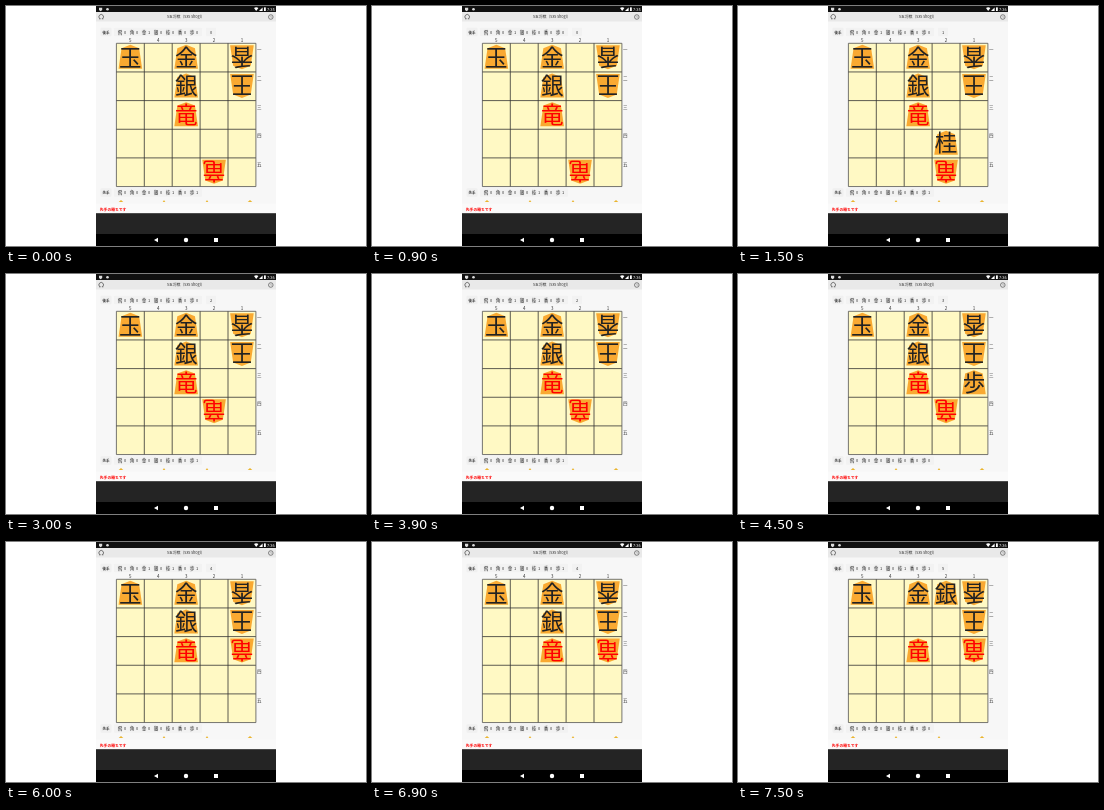
Recreate the animation shown at these times as an HTML page. Size 360x240 px, loop 9000 ms.

```html
<!DOCTYPE html>
<html>
<head>
<meta charset="utf-8">
<title>5x5 shogi</title>
<style>
html, body { margin: 0; width: 100%; height: 100%; overflow: hidden; background: #fff; }
svg { display: block; width: 360px; height: 240px; }
text { font-family: "Noto Sans CJK JP", "Noto Sans CJK", sans-serif; text-anchor: middle; }
.start { text-anchor: start; }
.latin { font-family: Roboto, sans-serif; }
</style>
</head>
<body>
<svg id="stage" viewBox="0 0 360 240"></svg>
<script>
const STEP = 1500;
const stage = document.getElementById('stage');
const NS = stage.namespaceURI;
const KINDS = [...'飛角金銀桂香歩'];
const W = 27.9, H = 28.65;
const gridX = col => 110.4 + col * W;
const gridY = row => 37.3 + row * H;

function add(parent, tag, attrs, content) {
  const el = document.createElementNS(NS, tag);
  for (const key in attrs) el.setAttribute(key, attrs[key]);
  if (content !== undefined) el.textContent = content;
  parent.appendChild(el);
  return el;
}
const rect = (x, y, width, height, fill, more) =>
  add(stage, 'rect', { x, y, width, height, fill, ...more });
const circle = (cx, cy, r, attrs) => add(stage, 'circle', { cx, cy, r, ...attrs });
const path = (d, attrs) => add(stage, 'path', { d, ...attrs });
const label = (x, y, size, content, more) =>
  add(stage, 'text', { x, y, 'font-size': size, fill: '#333', ...more }, content);

function piece(name, col, row, { flip = false, color = '#222' } = {}) {
  const g = add(stage, 'g', {});
  add(g, 'path', { d: 'M0-12.2L8.8-8.8L11.8 11.8H-11.8L-8.8-8.8Z', fill: '#f9a931' });
  add(g, 'text', { y: 8.5, 'font-size': 22.5, 'font-weight': 500, fill: color }, name);
  const place = (c, r) => {
    const x = gridX(c + .5), y = gridY(r + .5) - .6;
    g.setAttribute('transform', `translate(${x} ${y})${flip ? ' rotate(180)' : ''}`);
  };
  place(col, row);
  return { place, show: on => g.setAttribute('display', on ? 'inline' : 'none') };
}

function hand(y, name) {
  rect(94.5, y, 11, 8.5, '#f0f0f0', { rx: 1 });
  rect(108, y, 88, 8.5, '#f2f2f2', { rx: 1 });
  label(100, y + 5.9, 3.5, name, { 'font-weight': 700 });
  return KINDS.map((kind, i) => {
    const x = 114 + i * 12;
    rect(x - 2.2, y + 2, 4.4, 4.6, '#ddd', { rx: .7 });
    label(x, y + 5.9, 4.2, kind);
    return label(x + 5, y + 5.9, 4, '0');
  });
}

// Device and bars
rect(90, 0, 180, 240, '#f7f7f7');
rect(90, 0, 180, 6, '#101010');
rect(90, 6, 180, 9.5, '#e9e9e9');
path('M93 1.7h3.2v2.4l-1.6 1.2l-1.6-1.2Z', { fill: '#ddd' });
circle(101.5, 3.2, 1.3, { fill: '#ddd' });
path('M248 2l2.2 2.9L252.4 2q-2.2-1.3-4.4 0Z', { fill: '#fff' });
path('M256.6 1.4v3.6h-3.6Z', { fill: '#fff' });
rect(258, 1.4, 1.8, 3.6, '#fff');
const clock = label(264.8, 4.7, 4, '', { fill: '#fff', class: 'latin' });
path('M93.8 12.6A2.3 2.3 0 1 1 96.6 12.6M93 12.8h1.6M95.8 12.8h1.6',
  { fill: 'none', stroke: '#444', 'stroke-width': .7 });
circle(264.8, 11, 2.3, { fill: 'none', stroke: '#555', 'stroke-width': .7 });
path('M264.8 9.8V11.2H266', { fill: 'none', stroke: '#777', 'stroke-width': .4 });
label(179.8, 12.4, 3.8, '5五将棋（5x5 shogi）');

const topHand = hand(21.7, '後手');
const lowHand = hand(182.2, '先手');
rect(200, 21.7, 10, 8.5, '#f2f2f2', { rx: 1 });
const moves = label(205, 27.6, 4, '');

// Board
rect(gridX(0), gridY(0), 5 * W, 5 * H, '#fff9c4');
for (let i = 0; i < 6; i++) {
  const stroke = i % 5 ? '#333' : '#555';
  path(`M${gridX(i)} ${gridY(0)}V${gridY(5)}M${gridX(0)} ${gridY(i)}H${gridX(5)}`,
    { stroke, 'stroke-width': .8 });
}
for (let i = 0; i < 5; i++) {
  label(gridX(i + .5), 35.8, 4.5, 5 - i);
  label(253.3, gridY(i + .5) - 6.4, 4.5, '一二三四五'[i]);
}

piece('玉', 0, 0);
piece('金', 2, 0);
piece('香', 4, 0, { flip: true });
piece('王', 4, 1, { flip: true });
piece('竜', 2, 2, { color: '#f00' });
const silver = piece('銀', 2, 1);
const knight = piece('桂', 3, 3);
const pawn = piece('歩', 4, 2);
const dragon = piece('竜', 3, 4, { flip: true, color: '#f00' });

// Footer
for (let i = 0; i < 4; i++) {
  const half = i % 3 ? 1.3 : 2.3;
  path(`M${115 + i * 43} 194l${half} 2h${-2 * half}Z`, { fill: '#eab530' });
}
rect(90, 197.5, 180, 9.7, '#fafafa');
label(93.8, 204.7, 3.8, '先手の勝ちです', { fill: '#f00', 'font-weight': 700, class: 'start' });
rect(90, 207.2, 180, 20.8, '#242424');
rect(90, 228, 180, 12, '#000');
path('M152 231.7v4.6l-4-2.3Z', { fill: '#fff' });
circle(180, 234, 2.2, { fill: '#fff' });
rect(208, 232, 4, 4, '#fff');

function show(step) {
  clock.textContent = step ? '7:36' : '7:35';
  moves.textContent = step;
  [0, 0, 1, 0, +(step >= 2), 0, +(step >= 4)]
    .forEach((n, i) => topHand[i].textContent = n);
  [0, 0, 0, 0, +(step < 1), 0, +(step < 3)]
    .forEach((n, i) => lowHand[i].textContent = n);
  knight.show(step === 1);
  pawn.show(step === 3);
  dragon.place(step < 4 ? 3 : 4, step < 2 ? 4 : step < 4 ? 3 : 2);
  silver.place(step < 5 ? 2 : 3, step < 5 ? 1 : 0);
}

const began = performance.now();
function tick() {
  show(Math.floor((performance.now() - began) / STEP) % 6);
  requestAnimationFrame(tick);
}
tick();
</script>
</body>
</html>
```
